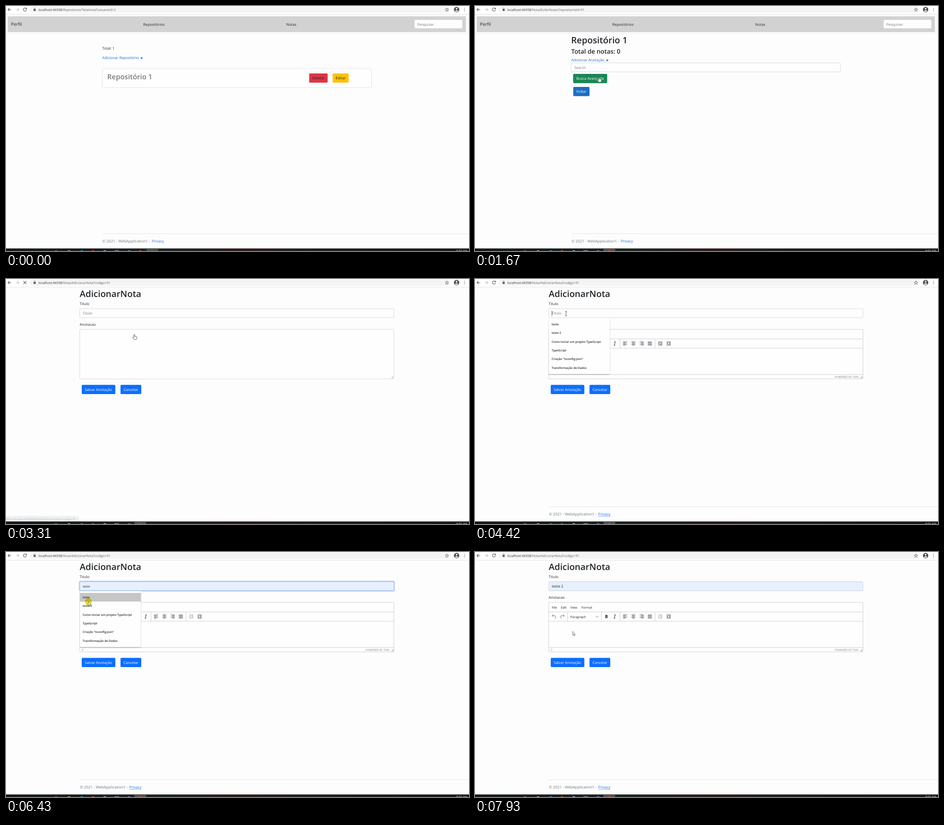
Recreate the animation shown at these times as an HTML page. Size 1027 px wide and 545 px high, loop 8000 ms.

```html
<!DOCTYPE html>
<html lang="pt">
<head>
<meta charset="utf-8">
<title>Notas</title>
<style>
html, body { margin: 0; width: 100%; height: 100%; overflow: hidden; background: #fdfdfd; }
svg { display: block; width: 1027px; height: 545px; }
text { font: 8.1px "Open Sans", "Noto Sans", sans-serif; fill: #212529; text-rendering: geometricPrecision; white-space: pre; }
.h1, .h2, .h3 { font-weight: 600; }
.h1 { font-size: 19.6px; }
.h2 { font-size: 15.7px; fill: #7b7b7b; }
.h3 { font-size: 13.8px; }
.brand { font-size: 10px; }
.url { font-size: 7.17px; fill: #5f6368; }
.url tspan { fill: #303236; }
.status text { font-size: 6.1px; fill: #4a4d52; }
.opt text { font-size: 6.45px; font-weight: 600; }
.tool text { font-size: 7.1px; }
.tool .tiny, .tiny { font-size: 6.05px; fill: #7a8087; }
.hint { fill: #757c84; }
.muted { fill: #6c757d; }
.white { fill: #fff; }
.link { fill: #1a6bd0; }
.blue { fill: #0d6efd; }
.line { fill: none; stroke: #303a48; stroke-width: 1.1; }
.box { fill: #fefefe; stroke: #ced4da; stroke-width: .9; }
.rule { fill: none; stroke: #c9c9c9; stroke-width: .9; }

/* visibility windows: hard cuts on an 8 s clock */
.t { opacity: 0; animation: 8s step-end infinite; }
.home { animation-name: home; }
.later { animation-name: later; }
.repo { animation-name: repo; }
.note { animation-name: note; }
.busca { animation-name: busca; }
.status1 { animation-name: status1; }
.status2 { animation-name: status2; }
.under { animation-name: under; }
.stop { animation-name: stop; }
.reload { animation-name: reload; }
.plain { animation-name: plain; }
.ready { animation-name: ready; }
.drop { animation-name: drop; }
.glow { animation-name: glow; }
.hot { animation-name: hot; }
.cold { animation-name: cold; }
.empty { animation-name: empty; }
.auto { animation-name: auto; }
.pick { animation-name: pick; }
.done { animation-name: done; }
.caret { animation-name: caret; }
.caret2 { animation-name: caret2; }
.halo { animation-name: halo; }
.arrow { animation-name: arrow; }
.hand { animation-name: hand; }
.beam { animation-name: beam; }
@keyframes home { 0% { opacity: 1 } 17%, 100% { opacity: 0 } }
@keyframes later { 0% { opacity: 0 } 17%, 100% { opacity: 1 } }
@keyframes repo { 17% { opacity: 1 } 39.4%, 100% { opacity: 0 } }
@keyframes note { 0% { opacity: 0 } 39.4%, 100% { opacity: 1 } }
@keyframes busca { 18% { opacity: 1 } 21.5%, 100% { opacity: 0 } }
@keyframes status1 { 13.87% { opacity: 1 } 20.87%, 100% { opacity: 0 } }
@keyframes status2 { 35.6% { opacity: 1 } 41.3% { opacity: .4 } 42.37%, 100% { opacity: 0 } }
@keyframes under { 33.4% { opacity: 1 } 39.4%, 100% { opacity: 0 } }
@keyframes stop { 39.4% { opacity: 1 } 55.2%, 100% { opacity: 0 } }
@keyframes reload { 0% { opacity: 1 } 39.4% { opacity: 0 } 55.2%, 100% { opacity: 1 } }
@keyframes plain { 0% { opacity: 1 } 48.25%, 100% { opacity: 0 } }
@keyframes ready { 0% { opacity: 0 } 48.25%, 100% { opacity: 1 } }
@keyframes drop { 55.2% { opacity: 1 } 81.5%, 100% { opacity: 0 } }
@keyframes glow { 56% { opacity: 1 } 92.5%, 100% { opacity: 0 } }
@keyframes hot { 0% { opacity: 1 } 58.1%, 100% { opacity: 0 } }
@keyframes cold { 0% { opacity: 0 } 58.1%, 100% { opacity: 1 } }
@keyframes empty { 0% { opacity: 1 } 80.3%, 100% { opacity: 0 } }
@keyframes auto { 0% { opacity: 0 } 80.3%, 100% { opacity: 1 } }
@keyframes pick { 80.3% { opacity: 1 } 81.5%, 100% { opacity: 0 } }
@keyframes done { 0% { opacity: 0 } 81.5%, 100% { opacity: 1 } }
@keyframes caret { 55.2% { opacity: 1 } 61% { opacity: 0 } 67.6% { opacity: 1 } 80.3%, 100% { opacity: 0 } }
@keyframes caret2 { 92.5% { opacity: 1 } 99.1%, 100% { opacity: 0 } }
@keyframes halo {
  13.87% { opacity: 1 } 17% { opacity: 0 }
  36.2% { opacity: 1 } 38.5% { opacity: 0 }
  53.1% { opacity: 1 } 54.2% { opacity: 0 }
  80.3% { opacity: 1 } 81.5% { opacity: 0 }
  92.2% { opacity: 1 } 93.1%, 100% { opacity: 0 }
}
@keyframes arrow { 3.12% { opacity: 1 } 12% { opacity: 0 } 21.5% { opacity: 1 } 30% { opacity: 0 } 64.5%, 100% { opacity: 1 } }
@keyframes hand { 12% { opacity: 1 } 21.5% { opacity: 0 } 33.3% { opacity: 1 } 44.37%, 100% { opacity: 0 } }
@keyframes beam { 30% { opacity: 1 } 33.3% { opacity: 0 } 44.37% { opacity: 1 } 64.5%, 100% { opacity: 0 } }

.mouse { animation: mouse 8s linear infinite; }
@keyframes mouse {
  0%, 3.12% { transform: translate(860px, 439px) }
  7.5% { transform: translate(480px, 210px) }
  9.75% { transform: translate(300px, 119px) }
  12%, 20.87% { transform: translate(274.5px, 157.5px) }
  22.5% { transform: translate(330px, 190px) }
  25% { transform: translate(602px, 230px) }
  28% { transform: translate(380px, 170px) }
  30.75% { transform: translate(287.5px, 133px) }
  32.5%, 32.9% { transform: translate(287.5px, 131.3px) }
  33.4%, 47.25% { transform: translate(284.5px, 123px); animation-timing-function: ease-in-out }
  53.1%, 63% { transform: translate(202px, 77px); animation-timing-function: ease-in-out }
  68.9%, 80.2% { transform: translate(183px, 101px) }
  80.3%, 84.1% { transform: translate(182.5px, 110.7px); animation-timing-function: ease-in-out }
  92.2%, 100% { transform: translate(216.5px, 176.5px) }
}
</style>
</head>
<body>
<svg viewBox="0 0 1027 545" width="1027" height="545">
<defs>
  <linearGradient id="bar">
    <stop offset="0" stop-color="#15191d"/><stop offset=".35" stop-color="#1d2420"/>
    <stop offset=".5" stop-color="#2c1c1c"/><stop offset=".7" stop-color="#1c211c"/><stop offset="1" stop-color="#17191b"/>
  </linearGradient>
  <filter id="soft" x="-10%" y="-10%" width="120%" height="120%"><feGaussianBlur stdDeviation="1.3"/></filter>
  <g id="nav">
    <rect y="19" width="1027" height="43.5" fill="#f9f9f9"/>
    <rect x="4" y="23" width="1016" height="35" fill="#d2d2d2"/>
    <text class="brand" x="11" y="44.4">Perfil</text>
    <text x="304.6" y="43.7">Repositórios</text>
    <text x="621.6" y="43.7">Notas</text>
    <rect class="box" x="906" y="30.5" width="106.500" height="19.500" rx="2"/>
    <text class="hint" x="912.5" y="43.600">Pesquisar</text>
  </g>
  <g id="foot">
    <path d="M0 506.500H1027" stroke="#dfe2e5"/>
    <text class="muted" y="526.300" style="font-size:8.35px">© 2021 - WebApplication1 -</text>
  </g>
  <path id="plus" d="M-2.300 0H2.300M0-2.300V2.300" stroke="#1a6bd0" stroke-width="1.400"/>
  <path id="indents" d="M-4.500-3.500H4.500M0-1.200H4.500M0 1.200H4.500M-4.500 3.500H4.500"/>
</defs>

<!-- browser bar -->
<rect width="1027" height="18" fill="#fff"/>
<rect x="52" y="1.500" width="934" height="13.500" rx="6.700" fill="#f3f4f5"/>
<path d="M0 18.200H1027" stroke="#dcdddf" stroke-width=".8"/>
<g fill="none" stroke="#4c4f53" stroke-width="1.100">
  <path d="M11.500 8H4.500M7.700 4.600L4.300 8L7.700 11.400"/>
  <path d="M21.500 8H28.500M25.300 4.600L28.700 8L25.300 11.400" stroke="#bcbec1"/>
  <path class="t reload" d="M45 5.800A3.500 3.500 0 1 0 45.500 8.800M45.500 4V6.800H42.700"/>
  <path class="t stop" d="M38.700 4.700L45.300 11.300M45.300 4.700L38.700 11.300"/>
  <path d="M62 7V5.900A1.500 1.500 0 0 1 65 5.900V7" stroke-width=".8"/>
  <path d="M978 4.300L979 7L981.900 7.100L979.600 8.900L980.400 11.700L978 10.100L975.600 11.700L976.400 8.900L974.100 7.100L977 7Z" stroke-width=".8"/>
</g>
<rect x="61.200" y="7" width="4.600" height="3.700" rx=".5" fill="#4c4f53"/>
<circle cx="999.500" cy="8" r="6" fill="#4c4f53"/>
<circle cx="999.500" cy="6" r="1.900" fill="#fff"/>
<path d="M995.500 11.500Q999.500 7.300 1003.500 11.500Q999.500 14 995.500 11.500Z" fill="#fff"/>
<g fill="#4c4f53"><circle cx="1017" cy="5" r=".8"/><circle cx="1017" cy="8" r=".8"/><circle cx="1017" cy="11" r=".8"/></g>

<!-- repository list -->
<g class="t home">
  <text class="url" x="72" y="10.500"><tspan>localhost:44358</tspan>/Repositorio/TelaInicial?usuarioId=2</text>
  <use href="#nav"/>
  <text x="213.600" y="96.700">Total: 1</text>
  <text class="link" x="213.600" y="118.200">Adicionar Repositório</text>
  <use href="#plus" x="300.700" y="115.800"/>
  <rect class="box" x="213.500" y="139" width="597" height="42.300" rx="2" style="stroke:#dfdfdf"/>
  <text class="h2" x="224.600" y="162.700">Repositório 1</text>
  <rect x="672.500" y="150" width="41" height="20.500" rx="2" fill="#dc3545"/>
  <text x="679" y="163.400">Deletar</text>
  <rect x="724.500" y="150" width="35.500" height="20.500" rx="2" fill="#ffc107"/>
  <text x="731.300" y="163.400">Editar</text>
  <use href="#foot" x="214"/>
  <text class="link" x="323.500" y="526.300">Privacy</text>
</g>

<!-- one repository -->
<g class="t repo">
  <text class="url" x="72" y="10.500"><tspan>localhost:44358</tspan>/Nota/ExibirNotas?repositorioId=91</text>
  <use href="#nav"/>
  <text class="h1" x="213.300" y="82.600">Repositório 1</text>
  <text class="h3" x="213.600" y="106">Total de notas: 0</text>
  <text class="link" x="213.600" y="123">Adicionar Anotação</text>
  <path class="t under" d="M213.600 124.500H288" stroke="#1a6bd0" stroke-width=".6"/>
  <use href="#plus" x="293.500" y="120.800"/>
  <rect class="box" x="213.500" y="126.500" width="597" height="20" rx="2"/>
  <text class="hint" x="220.300" y="140">Search</text>
  <rect x="218.200" y="151.500" width="74.500" height="19.500" rx="2" fill="#fefefe" stroke="#3f9a6c" stroke-width=".9"/>
  <text x="224.700" y="164.200" style="fill:#2f8f5f">Busca Avançada</text>
  <g class="t busca">
    <rect x="217.800" y="151" width="75.300" height="20.500" rx="2" fill="#198754"/>
    <text class="white" x="224.700" y="164.200">Busca Avançada</text>
  </g>
  <rect x="218" y="180" width="36" height="20.500" rx="2" fill="#1b6ec2"/>
  <text class="white" x="224.600" y="193.300">Voltar</text>
  <use href="#foot" x="214"/>
  <text class="link" x="323.500" y="526.300">Privacy</text>
</g>

<!-- new note -->
<g class="t note">
  <text class="url" x="72" y="10.500"><tspan>localhost:44358</tspan>/Nota/AdicionarNota?codigo=91</text>
  <text class="h1" x="163.600" y="39.500">AdicionarNota</text>
  <text x="163.600" y="58">Titulo</text>
  <text x="163.600" y="104">Anotacao</text>

  <rect class="t glow" x="161.500" y="63.800" width="701" height="24.400" rx="3.500" fill="#c1d9fd"/>
  <rect class="box" x="163.500" y="66" width="697" height="20" rx="2"/>
  <rect class="t auto" x="163.500" y="66" width="697" height="20" rx="2" fill="#e8f0fe" stroke="#ced4da" stroke-width=".9"/>
  <rect class="t glow" x="163.500" y="66" width="697" height="20" rx="2" fill="none" stroke="#86b7fe" stroke-width=".9"/>
  <text class="hint t empty" x="170.300" y="79.400">Titulo</text>
  <text class="t pick" x="170.200" y="79.300" style="font-size:6.95px">teste</text>
  <text class="t done" x="170.300" y="79.400">teste 2</text>
  <path class="t caret" d="M170.700 70.500V82" stroke="#222" stroke-width=".8"/>

  <g class="t plain">
    <rect class="box" x="163.500" y="112" width="697" height="110.300" rx="2"/>
    <path d="M855 221L859.500 216.500M857.500 221L859.500 219" stroke="#777" stroke-width=".7"/>
  </g>

  <g class="t ready tool">
    <rect x="163.700" y="112" width="696.700" height="110.200" fill="#fefefe"/>
    <path class="rule" d="M163.700 112H860.400V222.200H163.700ZM163.700 133.300H860.400M163.700 154H860.400M163.700 212.500H860.400M205.500 133.300V154M280.300 133.300V154M321.500 133.300V154M399.500 133.300V154"/>
    <text x="170.300" y="125.700">File</text>
    <text x="190.500" y="125.700">Edit</text>
    <text x="211.500" y="125.700">View</text>
    <text x="236" y="125.700">Format</text>
    <g class="line" style="stroke:#8f959d">
      <path d="M173.500 139L171 141.600L173.500 144.200M171 141.600H176.500Q179 142 179 144.500T176.500 147.300"/>
      <path d="M195.500 139L198 141.600L195.500 144.200M198 141.600H192.500Q190 142 190 144.500T192.500 147.300"/>
      <path d="M268.500 142.300L271 144.800L273.500 142.300"/>
    </g>
    <text x="211.600" y="146.600">Paragraph</text>
    <text x="288.300" y="147.200" style="font-size:9.8px;font-weight:700">B</text>
    <path class="line" d="M308.800 139.800H312.300M307.700 147.300H311.200M310.800 139.800L309.200 147.300"/>
    <path class="line" d="M328.500 140H337.500M328.500 142.300H334M328.500 144.700H337.500M328.500 147H334M346.800 140H355.800M348.600 142.300H354M346.800 144.700H355.800M348.600 147H354M365.300 140H374.300M368.800 142.300H374.300M365.300 144.700H374.300M368.800 147H374.300M383.300 140H392.300M383.300 142.300H392.300M383.300 144.700H392.300M383.300 147H392.300"/>
    <g class="line t hot"><use href="#indents" x="411" y="143.500"/><path d="M409 141.700L407.200 143.500L409 145.300"/></g>
    <g class="line t cold" style="stroke:#9a9fa6"><use href="#indents" x="411" y="143.500"/><path d="M409 141.700L407.200 143.500L409 145.300"/></g>
    <g class="line"><use href="#indents" x="429.500" y="143.500"/><path d="M425.500 141.700L427.300 143.500L425.500 145.300"/></g>
    <text class="tiny t cold" x="168.300" y="219.600">P</text>
    <text class="tiny" x="798" y="219.800">POWERED BY TIVN</text>
    <path d="M855 221L859.500 216.500M857.500 221L859.500 219" stroke="#666" stroke-width=".8"/>
    <path class="t caret2" d="M172.500 163V174" stroke="#222" stroke-width=".8"/>
  </g>

  <rect class="blue" x="168" y="235.500" width="74.500" height="20.500" rx="2"/>
  <text class="white" x="174.600" y="248.800">Salvar Anotação</text>
  <rect class="blue" x="254" y="235.500" width="46" height="20.500" rx="2"/>
  <text class="white" x="260.700" y="248.800">Cancelar</text>

  <g class="t ready">
    <use href="#foot" x="164"/>
    <text class="blue" x="273.600" y="526.300">Privacy</text>
    <path d="M273.600 527.800H300" stroke="#0d6efd" stroke-width=".6"/>
  </g>

  <g class="t drop opt">
    <rect x="164" y="89" width="135" height="123.500" fill="#777" opacity=".65" filter="url(#soft)"/>
    <rect x="163.700" y="87" width="135.500" height="124.500" rx="1" fill="#fefefe"/>
    <rect class="t pick" x="163.700" y="91" width="135.500" height="19.200" fill="#c6c6c6"/>
    <text x="170" y="103">teste</text>
    <text x="170" y="122.300">teste 2</text>
    <text x="170" y="141.700">Como iniciar um projeto TypeScript</text>
    <text x="170" y="161">TypeScript</text>
    <text x="170" y="180.400">Criação "tsconfig.json"</text>
    <text x="170" y="199.700">Transformação de Dados</text>
  </g>
</g>

<!-- link targets -->
<g class="t status1 status">
  <path d="M0 527.500H168Q170 527.500 170 529.500V540H0Z" fill="#dee1e6" stroke="#c4c8cd" stroke-width=".6"/>
  <text x="-1.500" y="535.800">https://localhost:44358/Nota/ExibirNotas?repositorioId=91</text>
</g>
<g class="t status2 status">
  <path d="M0 527.500H159Q161 527.500 161 529.500V540H0Z" fill="#dee1e6" stroke="#c4c8cd" stroke-width=".6"/>
  <text x="-1.500" y="535.800">https://localhost:44358/Nota/AdicionarNota?codigo=91</text>
</g>

<!-- taskbar -->
<rect y="539.300" width="1027" height="6" fill="url(#bar)"/>
<rect class="t home" x="311.500" y="539.300" width="26" height="6" fill="#4d5150"/>
<rect class="t later" x="285" y="539.300" width="26" height="6" fill="#57504f"/>
<g>
  <circle cx="111" cy="547.500" r="4" fill="#8a6a3a"/>
  <circle cx="140" cy="547.500" r="4" fill="#e0b94c"/>
  <circle cx="168" cy="547.500" r="4" fill="#2b8fd6"/>
  <circle cx="193" cy="547.500" r="4" fill="#d8434f"/>
  <circle cx="219" cy="547.500" r="4" fill="#c3c2ea"/>
  <rect x="240.500" y="543.500" width="10" height="4" fill="#8292b0"/>
  <circle cx="273" cy="547.500" r="4" fill="#8a83b8"/>
  <circle cx="298" cy="547.500" r="4" fill="#dc4b45"/>
</g>
<text class="white" x="999" y="546.800" style="font-size:6.3px">9:55 AM</text>

<!-- pointer, hot spot at 0,0 -->
<g class="mouse">
  <circle class="t halo" r="7.800" fill="#f0e51c" opacity="0" style="mix-blend-mode:multiply"/>
  <path class="t arrow" d="M0 0V8.700L2 6.900L3.400 10L4.800 9.400L3.400 6.400H6Z" fill="#fff" stroke="#333" stroke-width=".7"/>
  <path class="t hand" d="M-.9.700Q0-.6.900.700V4.300L5.200 5.200Q6 5.600 5.800 7L4.700 11.500H-.6L-3.500 7.500Q-3.800 6.200-2.500 6.200L-.9 7.500Z" fill="#fff" stroke="#333" stroke-width=".8"/>
  <path class="t beam" d="M-2-5H-.5L0-4.500L.5-5H2M0-4.500V4.500M-2 5H-.5L0 4.500L.5 5H2" fill="none" stroke="#333" stroke-width=".9"/>
</g>
</svg>
</body>
</html>
```
